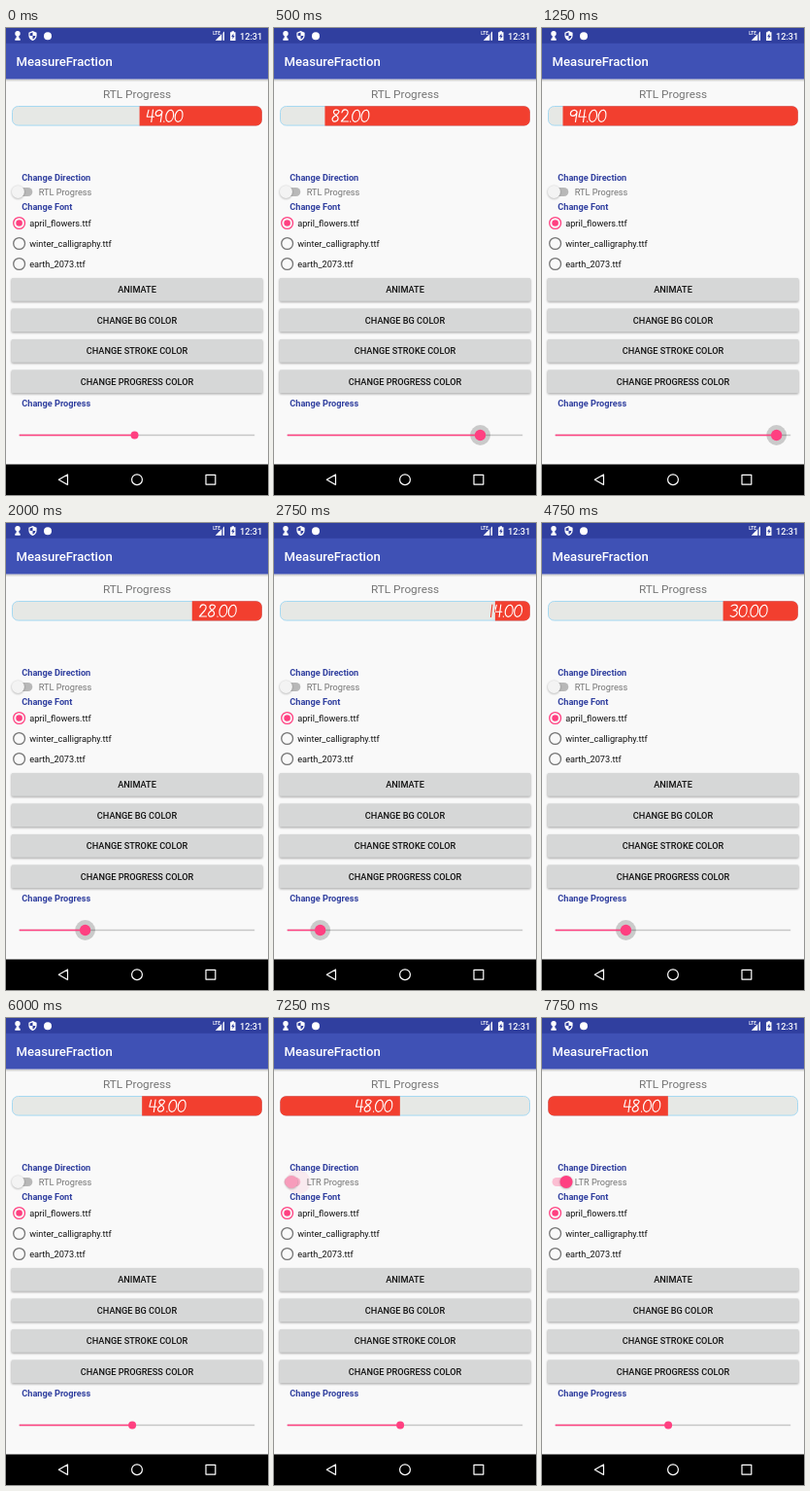
Write an HTML page that moves like this. It is 270x480 px and loops after 8 s.

```html
<!DOCTYPE html>
<html lang="en">
<head>
<meta charset="utf-8">
<title>Progress demo</title>
<style>
  html, body { margin: 0; width: 100%; height: 100%; overflow: hidden; background: #f9f9f9; }
  svg { display: block; width: 270px; height: 480px; }
  text { font: 400 9.19px Roboto, sans-serif; fill: #111; }
  .title { font-size: 13.13px; font-weight: 500; fill: #fff; }
  .clock { font-weight: 500; fill: #fff; }
  .lte { font-size: 4.6px; font-weight: 700; fill: #fff; }
  .top { font-size: 11.81px; fill: #757575; text-anchor: middle; }
  .head { font-weight: 700; fill: #303f9f; }
  .label { fill: #757575; }
  .btn { font-weight: 500; text-anchor: middle; }
  .digits { fill: none; stroke-width: 1.15; stroke-linecap: round; stroke-linejoin: round; }
</style>
</head>
<body>
<svg viewBox="0 0 270 480" xmlns="http://www.w3.org/2000/svg">
  <defs>
    <linearGradient id="drop" x2="0" y2="1">
      <stop offset="0" stop-opacity=".22"/><stop offset="1" stop-opacity="0"/>
    </linearGradient>
    <filter id="soft" x="-50%" y="-50%" width="200%" height="200%"><feGaussianBlur stdDeviation=".9"/></filter>
    <clipPath id="round"><rect x="6.3" y="80.2" width="257.5" height="20.2" rx="6"/></clipPath>
    <clipPath id="filled"><rect id="cut" y="80" height="21"/></clipPath>
  </defs>
  <rect width="270" height="480" fill="#f9f9f9"/>

  <rect y="52.5" width="270" height="3" fill="url(#drop)"/>
  <rect width="270" height="52.5" fill="#3f51b5"/>
  <rect width="270" height="15.75" fill="#303f9f"/>
  <text class="title" x="10.5" y="39">MeasureFraction</text>

  <g fill="#fff">
    <circle cx="12" cy="5.8" r="2.7"/>
    <path d="M11 7.5h2l.7 3.2h1v2H9.3v-2h1z"/>
    <path d="M27.5 3l4.1 1.7v3c0 2.600-1.700 4.500-4.100 5.300c-2.400-.8-4.100-2.700-4.100-5.300v-3z"/>
    <path d="M27.500 4.400v3.600h2.900c-.2 1.700-1.300 2.900-2.900 3.600v-3.600h-2.900v-2.400z" fill="#303f9f"/>
    <circle cx="43" cy="8.200" r="4"/>
    <path d="M225 3.500v9.200h-9.200z" opacity=".3"/>
    <path d="M222 6.500v6.200h-6.200z"/>
    <path d="M225 3.500v9.200h-1.200V4.700z"/>
    <path d="M232.600 3.200h2.400v1h1.500v8.700h-5.400V4.200h1.500z"/>
    <path d="M234.400 5.500l-2.200 3.500h1.300v2.600l2.100-3.500h-1.200z" fill="#303f9f"/>
  </g>
  <text class="lte" x="213.300" y="7">LTE</text>
  <text class="clock" x="241" y="11.600">12:31</text>

  <text class="top" x="135" y="71.800">RTL Progress</text>
  <rect x="6.500" y="80.500" width="257" height="19.600" rx="6" fill="#e6e8e5" stroke="#a6d9f2"/>
  <g clip-path="url(#round)"><rect id="fill" y="80" height="21" fill="#f23f2f"/></g>
  <path id="ink" class="digits" stroke="#f23f2f"/>
  <g clip-path="url(#filled)"><path id="paper" class="digits" stroke="#fff"/></g>

  <text class="head" x="16.300" y="156.700">Change Direction</text>
  <rect id="track" x="10.500" y="163.900" width="16.800" height="9.200" rx="4.600"/>
  <circle id="ripple" cx="25" cy="168.500" r="12.500" fill="#ff4081" opacity="0"/>
  <g id="knob">
    <circle cy="169.100" r="6.500" opacity=".3" filter="url(#soft)"/>
    <circle id="cap" cy="168.400" r="6.500"/>
  </g>
  <text id="dir" class="label" x="33.800" y="171.700"></text>

  <text class="head" x="16.300" y="187.200">Change Font</text>
  <g id="radios"></g>
  <g id="buttons"></g>

  <text class="head" x="16.300" y="388.700">Change Progress</text>
  <path d="M13.700 418.500H256.200" stroke="#c6c6c6" stroke-width="1.300"/>
  <circle id="halo" cy="418.500" r="10.400" opacity=".19"/>
  <path id="done" stroke="#ff4081" stroke-width="1.300"/>
  <circle id="thumb" cy="418.500" fill="#ff4081"/>

  <rect y="448.500" width="270" height="31.500"/>
  <g fill="none" stroke="#fff" stroke-width="1.200" stroke-linejoin="round">
    <path d="M54.300 464.200l9.200-5.200v10.400z"/>
    <circle cx="135" cy="464.200" r="5.400"/>
    <rect x="206" y="459.300" width="9.800" height="9.800"/>
  </g>
</svg>
<script>
const $ = id => document.getElementById(id);
const set = (id, attrs) => { for (const k in attrs) $(id).setAttribute(k, attrs[k]); };

$('radios').innerHTML = ['april_flowers.ttf', 'winter_calligraphy.ttf', 'earth_2073.ttf'].map((name, i) => {
  const y = 200.5 + 21 * i, color = i ? '#757575' : '#ff4081';
  return `<circle cx="13.6" cy="${y}" r="5.9" fill="none" stroke="${color}" stroke-width="1.3"/>` +
    (i ? '' : `<circle cx="13.6" cy="${y}" r="3.3" fill="${color}"/>`) +
    `<text x="24.2" y="${y + 3.2}">${name}</text>`;
}).join('');

$('buttons').innerHTML = ['ANIMATE', 'CHANGE BG COLOR', 'CHANGE STROKE COLOR', 'CHANGE PROGRESS COLOR'].map((name, i) => {
  const y = 256.9 + 31.5 * i;
  const box = (dy, extra) => `<rect x="5.7" y="${y + dy}" width="258.6" height="23.8" rx="1.3" ${extra}/>`;
  return box(1, 'opacity=".35" filter="url(#soft)"') + box(0, 'fill="#d6d7d7"') +
    `<text class="btn" x="135" y="${y + 15.2}">${name}</text>`;
}).join('');

// Pen strokes as relative curves: [advance, path from the glyph's corner]
const GLYPHS = {
  0: [9.4, 'm6.300 .8c-3.400-.5-5.700 3.500-5.800 7.300c-.1 3.600 1.700 5.200 3.600 4.700c3-.7 4.500-4.500 4.200-8.200c-.2-2.500-1.100-3.800-2.700-3.600'],
  1: [4.6, 'm2.600 .5l-1.400 12.500'],
  2: [9.2, 'm1.200 3.400c.7-2.400 2.800-3.200 4.400-2.800c2.500.6 2.200 3.600.4 5.900l-5.400 6h7.200'],
  3: [9.2, 'm1.500 2c1.500-1.800 6.200-2 6.200.8c0 2.200-2.600 3.200-4.200 3.400c3 0 4.600 1.300 4 3.500c-.8 3-5 4.100-7 2'],
  4: [8.7, 'm2.400 .8l-1.700 6.900h7.200m-1-7.200l-1.700 12.500'],
  5: [9.2, 'm7.800 .8h-5.200l-1 5.200c2.600-1.200 6-.6 5.900 2.600c-.1 4-4.700 5.200-6.900 3'],
  6: [9.2, 'm6.300 .5c-3.200 2.200-5.800 6.200-5.600 9.300c.2 4 6 3.900 6.900.2c.6-3.200-3.800-4.200-6.400-1'],
  7: [8.8, 'm1 1h7l-4.800 12'],
  8: [9.3, 'm7.700 2.300c-1.200-2.500-5.600-2.100-5.700.6c0 3 5 3.200 4.700 6.600c-.4 3.900-6 4.200-6.100.8c-.1-3.500 6.600-4 7.100-8'],
  9: [8.8, 'm7.700 3c-1.200-3.400-6.200-2.500-6.800 1.300c-.4 3.500 4.800 3.700 6.600-.8l.2-1l-1.700 10.500'],
  '.': [2.2, 'm.7 12.600l.1 .2']
};

function write(value) {
  let x = 0, d = '';
  for (const c of value.toFixed(2)) {
    d += `M${x} 0${GLYPHS[c][1]}`;
    x += GLYPHS[c][0];
  }
  return { d, width: x };
}

// [start ms, value, pressed]
const STEPS = [
  [0, 49, 0], [250, 58, 1], [500, 82, 1], [750, 97, 1],
  [1250, 94, 1], [1500, 83, 1], [1750, 60, 1], [2000, 28, 1], [2250, 2, 1],
  [2500, 7, 1], [2750, 14, 1], [3000, 16, 1], [3250, 10, 1], [3500, 5, 1],
  [3750, 8, 1], [4000, 14, 1], [4250, 21, 1], [4500, 27, 1], [4750, 30, 1],
  [5250, 36, 1], [5500, 43, 1], [5750, 48, 1], [6000, 48, 0]
];
// [start ms, on, knob x, cap colour, ripple opacity]
const TOGGLE = [
  [0, 0, 12.4, '#f3f3f3', 0],
  [7250, 1, 18, '#f79cbb', 0.08],
  [7500, 1, 25, '#ff4081', 0.14],
  [7750, 1, 25, '#ff4081', 0]
];
const at = (rows, t) => rows.filter(r => r[0] <= t).pop();

function draw(t) {
  const [, value, pressed] = at(STEPS, t);
  const [, ltr, knob, cap, ripple] = at(TOGGLE, t);
  const width = 258 * value / 100;
  const left = ltr ? 6 : 264 - width;
  const word = write(value);
  const x = ltr ? Math.max(13, left + width - 7 - word.width) : Math.min(left + 7, 222.3);
  set('fill', { x: left, width });
  set('cut', { x: left, width });
  for (const id of ['ink', 'paper']) set(id, { d: word.d, transform: `translate(${x} 83.500)` });

  set('track', { fill: ltr ? '#ff4081' : '#000', opacity: ltr ? 0.32 : 0.26 });
  set('knob', { transform: `translate(${knob} 0)` });
  set('cap', { fill: cap });
  set('ripple', { opacity: ripple });
  $('dir').textContent = ltr ? 'LTR Progress' : 'RTL Progress';

  const cx = 13.7 + 2.425 * value;
  set('done', { d: `M13.700 418.500H${cx}` });
  set('thumb', { cx, r: pressed ? 5.7 : 4 });
  set('halo', { cx, visibility: pressed ? 'visible' : 'hidden' });
}

const start = performance.now();
function tick() {
  draw((performance.now() - start) % 8000);
  requestAnimationFrame(tick);
}
tick();
</script>
</body>
</html>
```
